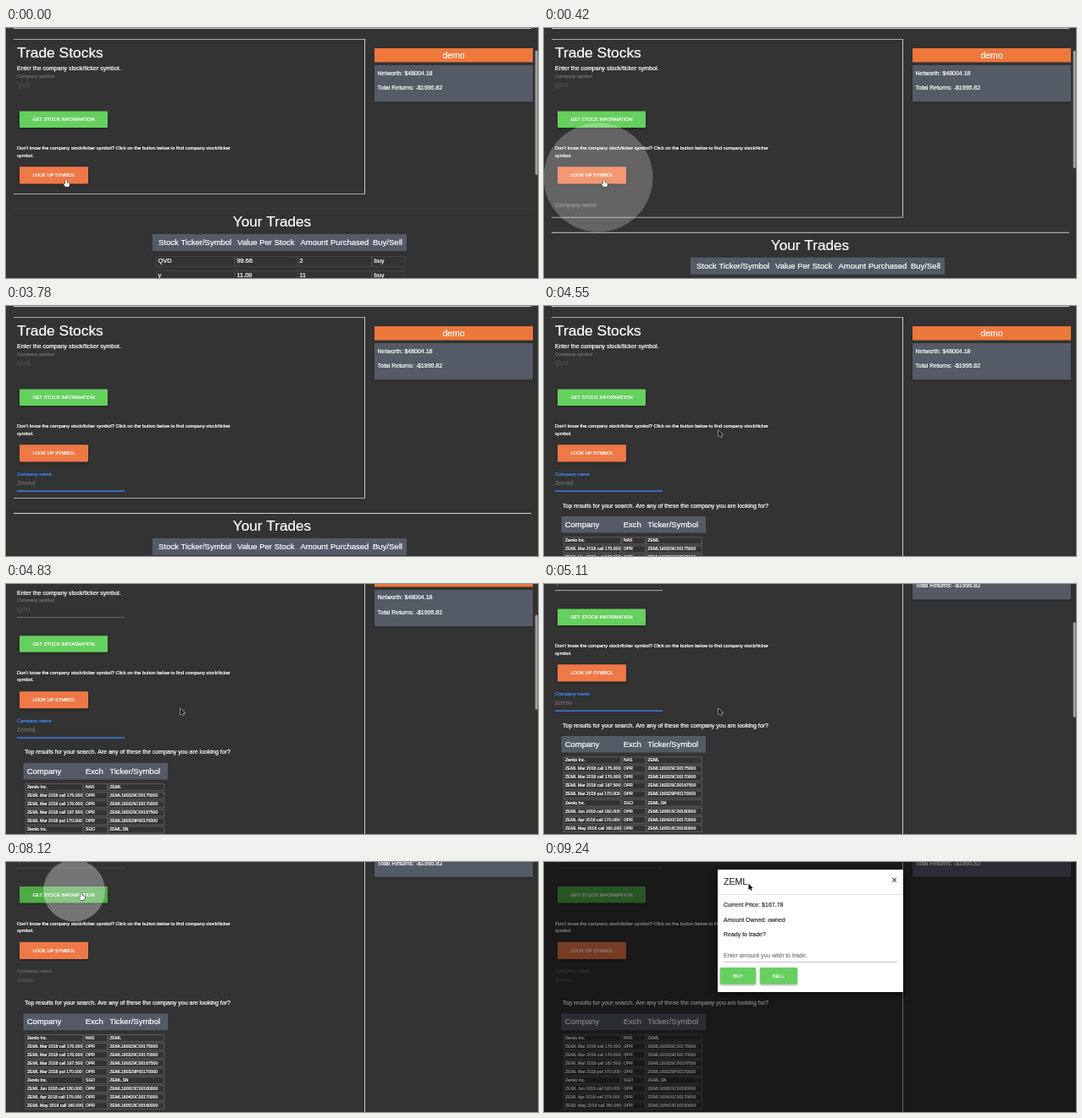
These frames come from a looping animation (628x296 px, 9.31 s). An HTML page with a canvas:

```html
<!DOCTYPE html>
<html lang="en">
<head>
<meta charset="utf-8">
<title>Trade Stocks</title>
<style>
html, body { margin: 0; width: 100%; height: 100%; overflow: hidden; background: #333; }
canvas { display: block; width: 628px; height: 296px; }
</style>
</head>
<body>
<canvas id="stage" width="628" height="296"></canvas>
<script>
const W = 628, H = 296, LOOP = 9310;
const ctx = document.getElementById('stage').getContext('2d');
const FONT = '"Liberation Sans", Arial, sans-serif';
const GREEN = '#66d05f', ORANGE = '#ef7847', BAR = '#ee773c', SLATE = '#545b67', BLUE = '#4288f5';
const COMPANY = 'Zemlo', TICKER = 'ZEML';
const KEY_TIMES = [2450, 2660, 2940, 3150, 3360];

const RESULTS = [
  [COMPANY + ' Inc.', 'NAS', TICKER],
  option('Mar', '175.000', '180329C'),
  option('Mar', '170.000', '180329C'),
  option('Mar', '167.500', '180329C'),
  option('Mar', '170.000', '180329P'),
  [COMPANY + ' Inc.', 'SGO', TICKER + '.SN'],
  option('Jun', '180.000', '180615C'),
  option('Apr', '170.000', '180420C'),
  option('May', '160.000', '180518C')
];

function option(month, strike, code) {
  const kind = code.endsWith('P') ? 'put' : 'call';
  const digits = strike.replace('.', '').padStart(8, '0');
  return [`${TICKER} ${month} 2018 ${kind} ${strike}`, 'OPR', TICKER + code + digits];
}

const clamp = v => Math.max(0, Math.min(1, v));
const mix = (a, b, k) => a + (b - a) * k;
const progress = (t, start, length) => clamp((t - start) / length);
const easeOut = k => 1 - (1 - k) * (1 - k);
const smooth = k => k * k * (3 - 2 * k);

// Interpolates between [time, ...values] keys.
function track(keys, t, ease = k => k) {
  let i = 0;
  while (i < keys.length - 2 && t >= keys[i + 1][0]) i++;
  const [a, b] = [keys[i], keys[i + 1]];
  const k = ease(progress(t, a[0], b[0] - a[0]));
  return a.slice(1).map((v, n) => mix(v, b[n + 1], k));
}

function rect(x, y, w, h, color) {
  ctx.fillStyle = color;
  ctx.fillRect(x, y, w, h);
}

// y is the middle of the capitals; the thin stroke adds a little weight.
function text(str, x, y, size, color = '#fff', { align = 'left', bold = false } = {}) {
  ctx.font = `${bold ? 'bold ' : ''}${size}px ${FONT}`;
  ctx.textAlign = align;
  ctx.fillStyle = ctx.strokeStyle = color;
  ctx.lineWidth = 0.22;
  const baseline = y + size * 0.33 - 0.3;
  ctx.fillText(str, x, baseline);
  if (!bold) ctx.strokeText(str, x, baseline);
}

function shadowed(blur, dy, alpha, draw) {
  ctx.save();
  ctx.shadowColor = `rgba(0,0,0,${alpha})`;
  ctx.shadowBlur = blur;
  ctx.shadowOffsetY = dy;
  draw();
  ctx.restore();
}

function button(label, x, y, w, h, color, bold) {
  shadowed(3, 1, 0.4, () => {
    ctx.fillStyle = color;
    ctx.beginPath();
    ctx.roundRect(x, y, w, h, 1);
    ctx.fill();
  });
  text(label, x + w / 2, y + h / 2 + 0.4, 5.65, '#fff', { align: 'center', bold });
}

function cells(edges, y, h, color) {
  ctx.strokeStyle = color;
  ctx.lineWidth = 0.6;
  for (let i = 0; i < edges.length - 1; i++) {
    ctx.strokeRect(edges[i], y, edges[i + 1] - edges[i] - 1.2, h);
  }
}

function ripple(t, start, x, y, radius) {
  const k = progress(t, start, 750);
  if (t < start || k >= 1) return;
  const alpha = 0.32 * (1 - progress(t, start + 300, 450));
  ctx.fillStyle = `rgba(255,255,255,${alpha})`;
  ctx.beginPath();
  ctx.arc(x, y, radius * easeOut(k), 0, 7);
  ctx.fill();
}

function profile() {
  rect(435, 24, 187, 16.5, BAR);
  text('demo', 528.5, 32.5, 10.4, '#fff', { align: 'center' });
  shadowed(2, 0.5, 0.35, () => rect(435, 44, 187, 43.3, SLATE));
  text('Networth: $48004.18', 438.5, 53.5, 7);
  text('Total Returns: -$1995.82', 438.5, 71, 7);
}

function trades(shift, lineAlpha) {
  ctx.save();
  ctx.translate(0, shift);
  rect(9, 214, 611, 1, `rgba(255,255,255,${mix(0.03, 0.8, lineAlpha)})`);
  text('Your Trades', 314, 229.5, 17.2, '#fff', { align: 'center' });
  rect(173, 244, 300, 20, SLATE);
  const headers = [180, 273, 347.5, 433], columns = [179.5, 272.5, 346.5, 434.5];
  ['Stock Ticker/Symbol', 'Value Per Stock', 'Amount Purchased', 'Buy/Sell']
    .forEach((s, i) => text(s, headers[i], 254.5, 9.5));
  [['QVD', '99.66', '2', 'buy'], ['y', '11.08', '11', 'buy']].forEach((row, r) => {
    const y = 276 + r * 17.2;
    cells([177, 270.5, 345, 432.5, 472], y - 5.5, 12, '#505050');
    row.forEach((s, i) => text(s, columns[i], y, 7.4));
  });
  ctx.restore();
}

function companyField(t) {
  const focus = easeOut(progress(t, 1240, 200));
  const focused = t >= 1240 && t < 5650;
  const label = focused ? BLUE : t < 1240 ? '#777' : '#666';
  text('Company name', 13, mix(210, 199.3, focus), mix(7, 5.75, focus), label);
  const typed = COMPANY.slice(0, KEY_TIMES.filter(k => t >= k).length);
  text(typed, 13, 209.7, 7.1, focused ? '#6a6a6a' : '#585858');
  if (!focused) return;

  const half = 63.5 * focus;
  rect(76.5 - half, 218.5, half * 2, 1.3, BLUE);
  const lastKey = KEY_TIMES.filter(k => t >= k).pop() || 1240;
  if ((t - lastKey) % 1000 < 500) {
    const x = 13.3 + ctx.measureText(typed).width;
    rect(x, 205.5, 0.7, 7.5, '#777');
  }
}

function results() {
  text('Top results for your search. Are any of these the company you are looking for?', 22, 236.5, 7);
  rect(20.5, 249, 170.5, 19.6, SLATE);
  const columns = [25, 94, 122.5];
  ['Company', 'Exch', 'Ticker/Symbol'].forEach((s, i) => text(s, columns[i] - 0.3, 259, 9.5));
  RESULTS.forEach((row, r) => {
    const y = 277.9 + r * 10.05;
    cells([23, 92, 121, 187.5], y - 4, 8, '#777');
    row.forEach((s, i) => text(s, columns[i], y, 5.08));
  });
}

function card(t, bottom) {
  rect(9, 13, 415, 1, '#aaa');
  rect(423, 13, 1, bottom - 13, '#ccc');
  rect(9, bottom, 415, 1, '#aaa');
  text('Trade Stocks', 13, 29.5, 17.4);
  text('Enter the company stock/ticker symbol.', 13, 48, 7.06);
  text('Company symbol', 13, 57, 5.7, '#707070');
  text('QVD', 13, 68, 7.2, '#525252');
  const [gray] = track([[4600, 51], [4830, 115], [5110, 185], [5500, 185], [5900, 75], [9310, 75]], t);
  rect(13, 76.2, 127, 0.9, `rgb(${gray},${gray},${gray})`);

  const hover = progress(t, 7800, 150);
  button('GET STOCK INFORMATION', 16, 98.5, 104, 19.5, hover > 0.5 ? '#4fab48' : GREEN);
  text("Don't know the company stock/ticker symbol? Click on the button below to find company stock/ticker", 13, 142.6, 5.69);
  text('symbol.', 13, 151, 5.69);
  button('LOOK UP SYMBOL', 16, 164.3, 81, 20.2, ORANGE);

  ctx.save();
  ctx.beginPath();
  ctx.rect(0, 188, 423, bottom - 188);
  ctx.clip();
  if (t > 150) companyField(t);
  if (t > 3790) results();
  ctx.restore();
}

function scrollbar(t, scroll, opened, found) {
  const alpha = t < 4600 ? 1 - progress(t, 1900, 270)
    : progress(t, 4620, 70) * (1 - progress(t, 5600, 270));
  const top = 26.5 + scroll * 0.27;
  const bottom = mix(mix(174, 165, opened), 138, found) + scroll * 0.29;
  ctx.fillStyle = `rgba(175,175,175,${alpha * 0.9})`;
  ctx.beginPath();
  ctx.roundRect(624.7, top, 3, bottom - top, 1.5);
  ctx.fill();
}

function modal(t) {
  const k = easeOut(progress(t, 8400, 350));
  if (!k) return;
  rect(0, 0, W, H, `rgba(0,0,0,${0.5 * k})`);
  ctx.save();
  ctx.globalAlpha = k;
  ctx.translate(314.5, mix(64, 81.5, k));
  ctx.scale(mix(0.7, 1, k), mix(0.7, 1, k));
  ctx.translate(-314.5, -81.5);
  shadowed(10, 4, 0.5, () => {
    ctx.fillStyle = '#fff';
    ctx.beginPath();
    ctx.roundRect(205, 9, 219, 145, 1);
    ctx.fill();
  });
  text(TICKER, 212, 23.5, 10.6, '#333');
  text('×', 413.5, 22, 11, '#555', { align: 'center', bold: true });
  rect(205, 38, 219, 0.8, '#ddd');
  text('Current Price: $167.78', 212, 50.7, 7, '#333');
  text('Amount Owned: owned', 212, 68.5, 7, '#333');
  text('Ready to trade?', 212, 86.2, 7, '#333');
  text('Enter amount you wish to trade.', 212, 111.2, 7, '#808080');
  rect(212, 118, 205, 0.8, '#bbb');
  button('BUY', 208, 125, 42, 19.5, GREEN, true);
  button('SELL', 255, 125, 44, 19.5, GREEN, true);
  ctx.restore();
}

const SHAPES = {
  arrow: new Path2D('M0 0V7.4L1.7 5.9L2.9 8.5L4.1 8L3 5.4H5.2Z'),
  hand: new Path2D('M-1 0.6Q0 -0.6 1 0.6V3L3.8 3.8Q4.3 4 4 5.5L3.2 8H-1L-3 5Q-2.6 3.8 -1 4.8Z'),
  beam: new Path2D('M-1.6 -4L0 -3.4L1.6 -4M0 -3.4V3.4M-1.6 4L0 3.4L1.6 4')
};

function cursor(t) {
  if (t > 2310 && t < 4200) return;
  const [x, y] = track([
    [600, 71, 180], [1240, 100, 214], [2240, 100, 214], [4200, 108, 212],
    [4550, 206, 147], [5460, 206, 147], [6440, 238, 240], [7000, 157, 209],
    [7910, 89, 37], [8750, 89, 37], [9240, 241.5, 25.5]
  ], t, smooth);
  const overField = t > 1100 && t < 4300;
  const overButton = t < 750 || (t > 7830 && t < 8850);
  ctx.save();
  ctx.translate(x, y);
  ctx.lineWidth = 1;
  if (overField) {
    ctx.strokeStyle = '#bbb';
    ctx.stroke(SHAPES.beam);
  } else {
    const shape = overButton ? SHAPES.hand : SHAPES.arrow;
    ctx.strokeStyle = overButton ? '#222' : '#eee';
    ctx.fillStyle = overButton ? '#fff' : '#111';
    ctx.stroke(shape);
    ctx.fill(shape);
  }
  ctx.restore();
}

function draw(t) {
  const opened = easeOut(progress(t, 150, 400));
  const found = easeOut(progress(t, 3790, 270));
  const [scroll] = track([[4630, 0], [4690, 9], [4830, 37], [4970, 57], [5110, 69], [5390, 69.5]], t);
  const shift = 31 * opened + 200 * found;

  rect(0, 0, W, H, '#333');
  ctx.save();
  ctx.translate(0, -scroll);
  rect(9, 0, 611, 1, '#ccc');
  profile();
  card(t, 196 + shift);
  trades(shift, opened);
  ripple(t, 10, 64, 177, 81);
  ripple(t, 7975, 80.5, 103.5, 104);
  ctx.restore();

  scrollbar(t, scroll, opened, found);
  modal(t);
  cursor(t);
}

const began = performance.now();
function tick() {
  draw((performance.now() - began) % LOOP);
  requestAnimationFrame(tick);
}
tick();
</script>
</body>
</html>
```
